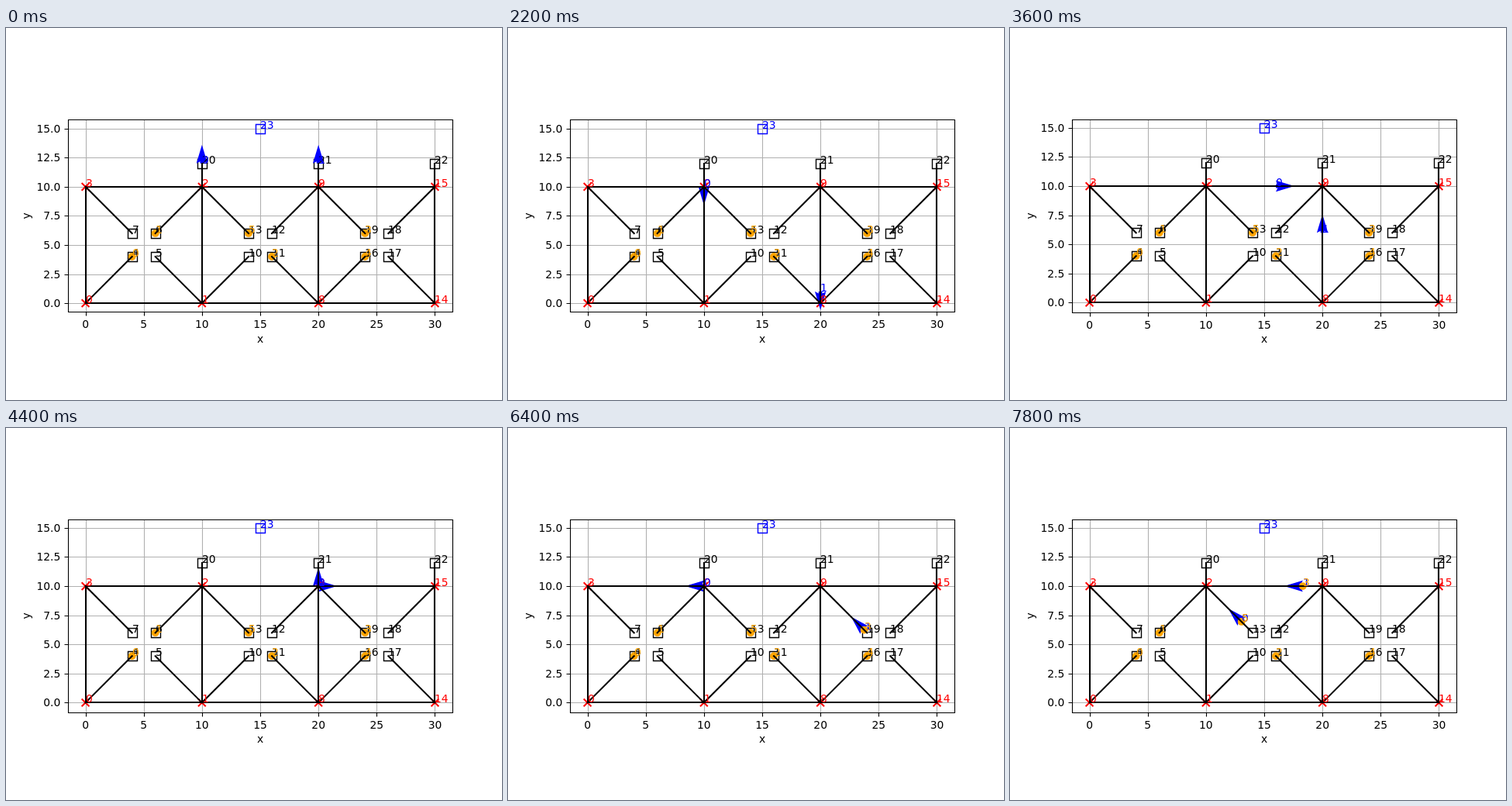
An HTML page that plays this animation: 640x480 px, repeating every 8000 ms.

```html
<!DOCTYPE html>
<html lang="en">
<head>
<meta charset="utf-8">
<title>Robots on a graph</title>
<style>
  html, body { margin: 0; width: 100%; height: 100%; overflow: hidden; background: #fff; }
  svg { display: block; width: 640px; height: 480px; font: 13.89px "DejaVu Sans", sans-serif; }
</style>
</head>
<body>
<svg id="stage" viewBox="0 0 640 480"></svg>
<script>
const STEP = 200, STEPS = 40;
const UNIT = 496 / 33, LEFT = 80, RIGHT = 576;
const GROW_STEP = 12; // the y axis widens slightly when a robot reaches the bottom row

const nodes = [
  [0, 0], [10, 0], [10, 10], [0, 10], [4, 4], [6, 4], [6, 6], [4, 6],
  [20, 0], [20, 10], [14, 4], [16, 4], [16, 6], [14, 6], [30, 0], [30, 10],
  [24, 4], [26, 4], [26, 6], [24, 6], [10, 12], [20, 12], [30, 12], [15, 15]
];
const crossings = [0, 1, 2, 3, 8, 9, 14, 15];
const edges = '0-1 1-8 8-14 3-2 2-9 9-15 0-3 1-2 8-9 14-15 0-4 1-5 3-7 2-6 1-10 2-13 ' +
  '8-11 9-12 8-16 9-19 14-17 15-18 2-20 9-21 15-22';

const robots = [
  {
    route: [[10, 11], [10, 12], [10, 10], [20, 10], [10, 10], [14, 6], [10, 10]],
    travelled: k => k <= 12 ? Math.min(k, 2) : k - 10
  },
  {
    route: [[20, 11], [20, 12], [20, 0], [20, 12], [20, 10], [24, 6], [20, 10], [10, 10]],
    travelled: k => k
  }
];
const goods = [
  { node: 4 }, { node: 6 }, { node: 11 },
  { node: 19, robot: 1, from: 32 },
  { node: 16 },
  { node: 13, robot: 0, from: 38 }
];

function pose({ route, travelled }, k) {
  let rest = travelled(k) + 1;
  for (let i = 1; i < route.length; i++) {
    const [ax, ay] = route[i - 1], [bx, by] = route[i];
    const dx = bx - ax, dy = by - ay, length = Math.hypot(dx, dy);
    if (rest <= length || i === route.length - 1) {
      const f = rest / length;
      return { at: [ax + dx * f, ay + dy * f], angle: -Math.atan2(dy, dx) * 180 / Math.PI };
    }
    rest -= length;
  }
}

const snap = v => Math.floor(v + .5);
const crisp = v => snap(v) + .5;
const stroke = (d, color, width, extra = '') =>
  `<path d="${d}" fill="none" stroke="${color}" stroke-width="${width}" ${extra}/>`;
const text = (x, y, label, color = '#000', anchor = 'start') =>
  `<text x="${x}" y="${y}" fill="${color}" text-anchor="${anchor}">${label}</text>`;

function render(k) {
  const dip = k >= GROW_STEP ? .1 : 0;
  const half = (15 + dip) * 1.1 * UNIT / 2;
  const top = 242.4 - half, bottom = 242.4 + half;
  const zero = bottom - (dip + (15 + dip) * .05) * UNIT;
  const px = x => LEFT + (x + 1.5) * UNIT;
  const py = y => zero - y * UNIT;
  const t = crisp(top), b = crisp(bottom);
  const nodeColor = i => crossings.includes(i) ? '#f00' : i === 23 ? '#00f' : '#000';
  const tag = ([x, y], label, color) => text(snap(px(x)), snap(py(y)), label, color);

  let grid = '', ticks = '', labels = '', marks = '', lines = '', tags = '';

  for (let x = 0; x <= 30; x += 5) {
    const gx = crisp(px(x));
    grid += `M${gx} ${t}V${b}`;
    ticks += `M${gx} ${b}v5`;
    labels += text(px(x), snap(bottom + 20.6), x, '#000', 'middle');
  }
  for (let y = 0; y <= 15; y += 2.5) {
    const gy = crisp(py(y));
    grid += `M${LEFT} ${gy}H${RIGHT}`;
    ticks += `M${LEFT + .5} ${gy}h-5`;
    labels += text(70.3, snap(py(y) + 5), y.toFixed(1), '#000', 'end');
  }
  labels += text(328, 406, 'x', '#000', 'middle') +
    `<text transform="translate(30.6 242.4) rotate(-90)" text-anchor="middle">y</text>`;

  nodes.forEach(([x, y], i) => {
    const cx = px(x), cy = py(y), color = nodeColor(i);
    marks += crossings.includes(i)
      ? stroke(`M${cx - 4.9} ${cy - 4.9}l9.8 9.8m0 -9.8l-9.8 9.8`, color, 2)
      : stroke(`M${crisp(cx) - 6} ${crisp(cy) - 6}h12v12h-12z`, color, 1.39);
    tags += tag([x, y], i, color);
  });

  for (const edge of edges.split(' ')) {
    const [[ax, ay], [bx, by]] = edge.split('-').map(i => nodes[i]);
    const fit = ax === bx || ay === by ? snap : v => v;
    lines += `M${fit(px(ax))} ${fit(py(ay))}L${fit(px(bx))} ${fit(py(by))}`;
  }

  const poses = robots.map(robot => pose(robot, k));
  poses.forEach(({ at, angle }, i) => {
    marks += `<path fill="#00f" d="M0 -2.4H2.4L0 -7.2L24 0L0 7.2L2.4 2.4H0z"
      transform="translate(${px(at[0])} ${py(at[1])}) rotate(${angle})"/>`;
    tags += tag(at, i, '#00f');
  });
  goods.forEach(({ node, robot, from }, i) => {
    const at = k >= from ? poses[robot].at : nodes[node];
    marks += `<circle cx="${px(at[0])}" cy="${py(at[1])}" r="4.9" fill="#ffa500"/>`;
    tags += tag(at, i, '#ffa500');
  });

  return `<clipPath id="axes"><path d="M${LEFT} ${t - .5}H${RIGHT}V${b}H${LEFT}z"/></clipPath>` +
    `<g clip-path="url(#axes)">` + stroke(grid, '#b0b0b0', 1.11) + marks +
    stroke(lines, '#000', 2.08, 'stroke-linecap="square"') + '</g>' +
    stroke(ticks, '#000', 1.11) +
    stroke(`M${LEFT + .5} ${t}H${RIGHT + .5}V${b}H${LEFT + .5}z`, '#000', 1.11) +
    labels + tags;
}

const stage = document.getElementById('stage');
const start = performance.now();
let shown = -1;
function tick() {
  const k = Math.floor((performance.now() - start) / STEP) % STEPS;
  if (k !== shown) stage.innerHTML = render(shown = k);
  requestAnimationFrame(tick);
}
tick();
</script>
</body>
</html>
```
